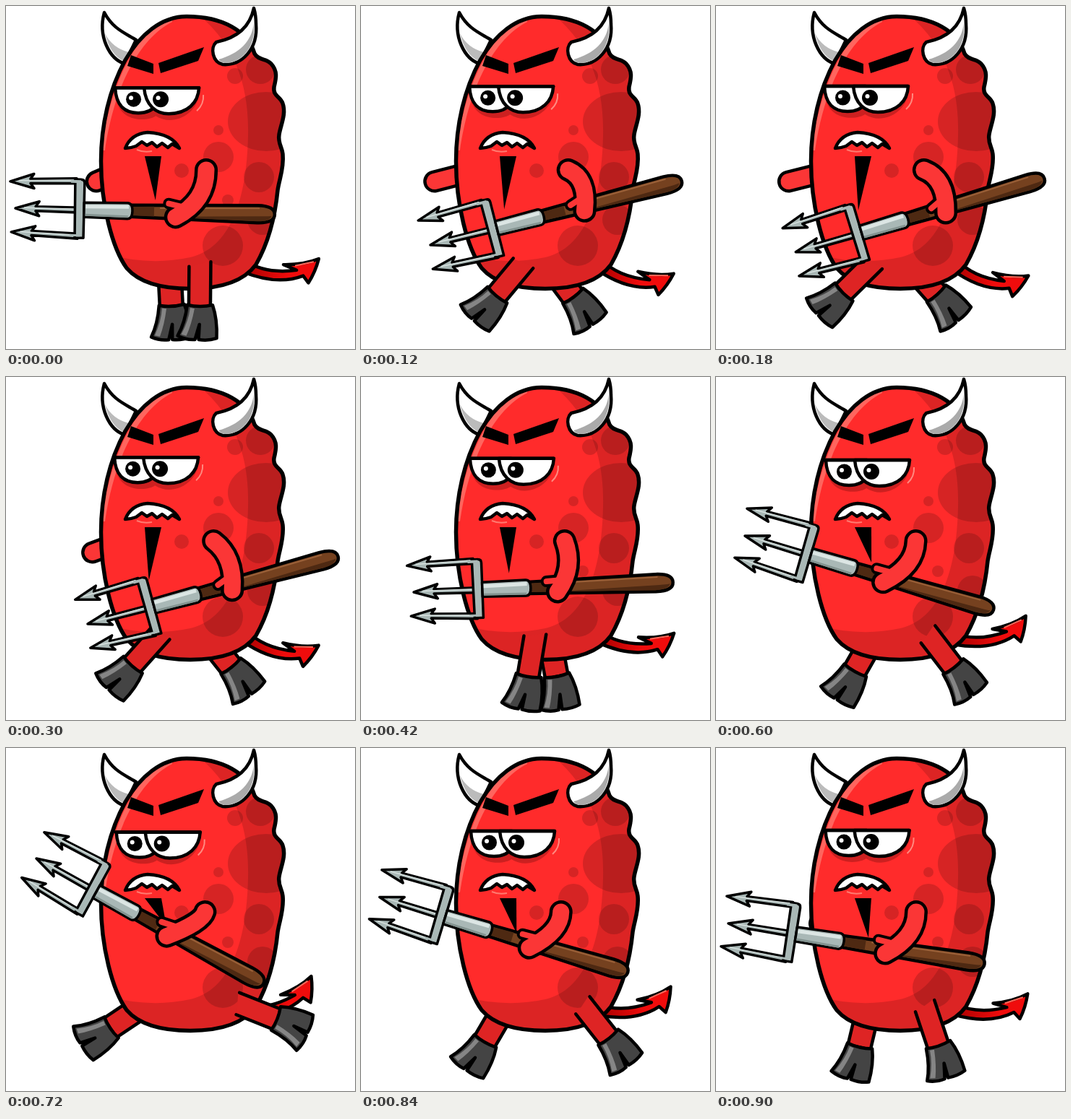
An HTML page that plays this animation: 483 by 475 pixels, repeating every 0.96 s.

```html
<!DOCTYPE html>
<html lang="en">
<head>
<meta charset="utf-8">
<title>Marching devil</title>
<style>
  html, body { margin: 0; height: 100%; overflow: hidden; background: #fff; }
  svg { display: block; width: 100vw; height: 100vh; }
  .ink { stroke: #000; stroke-width: 4.5; stroke-linejoin: round; stroke-linecap: round; }
  .line { fill: none; }
  .metal { fill: #a9b8b6; stroke-width: 3.5; }
  .limb { fill: none; stroke-linecap: round; stroke-linejoin: round; }
</style>
</head>
<body>
<svg viewBox="0 0 483 475">
  <defs>
    <path id="shape" d="M250 14.500C215 14.500 185 40 165 75C143 115 131.500 165 131.500 215C131.500 275 147 335 167 363C186 385 220 391.500 255 391.500C300 391.500 330 380 346 358C362 330 372 295 376 255C378 240 385 225 383 205C382 195 376 190 378 178C380 165 388 150 383 135C380 125 369 125 371 112C374 100 376 90 367 80C360 72 350 76 344 66C335 35 300 14.500 250 14.500Z"/>
    <clipPath id="inside"><use href="#shape"/></clipPath>
    <linearGradient id="tailRed">
      <stop offset="0" stop-color="#a80000"/><stop offset=".6" stop-color="#f00c0c"/>
    </linearGradient>
    <g id="hoof">
      <path class="ink" fill="#444" d="M-17 0Q-20 25-30 43Q-18 49-6 48L0 27L-1 48Q12 50 24 46Q25 20 18 0Q0 4-17 0Z"/>
      <path fill="#858585" d="M-13 4L-7 5Q-11 27-18 43L-25 41Q-15 22-13 4Z"/>
    </g>
    <g id="tine">
      <path class="ink metal" d="M28-3L92-3V4L28 3L33 10L0 0L33-10Z"/>
      <path class="line" stroke="#d8e2e0" stroke-width="1.500" d="M12-1H88"/>
    </g>
  </defs>

  <g id="tail">
    <path class="ink" fill="url(#tailRed)" d="M330 352Q358 372 402 367L384 359Q412 360 433 352Q428 370 418 385L411 375Q375 388 328 368Z"/>
    <path class="line" stroke="#ff6a5a" stroke-width="2" d="M400 361L426 356"/>
  </g>
  <g id="farArm" class="limb">
    <path stroke="#000" stroke-width="31"/>
    <path stroke="#fb3636" stroke-width="22"/>
  </g>
  <g id="farLeg">
    <path class="ink" fill="#de2424" d="M-16 2V-66H16V2Z"/>
    <use href="#hoof"/>
  </g>
  <path class="ink" fill="#fff" d="M136 9C148 32 166 38 180 47L164 80C143 73 127 42 136 9Z"/>
  <path fill="#bbb" d="M137 38Q147 58 170 64L164 77Q144 68 137 38Z"/>

  <g clip-path="url(#inside)">
    <path fill="#dc2424" d="M120 0H400V400H120Z"/>
    <path fill="#ff2b2b" d="M120 0H250C310 40 337 100 335 180C333 270 310 335 255 348Q200 360 140 344Z"/>
    <g id="spots" fill="#000" fill-opacity=".16"></g>
    <path fill="#ff655e" d="M230 15C185 30 145 100 132 200L137 200C150 110 185 45 230 22Z"/>
  </g>
  <use href="#shape" class="ink line" style="stroke-width:5.500"/>

  <path class="ink" fill="#fff" d="M343 3C338 27 321 44 291 50C282 58 286 78 300 81C326 83 349 60 346 25Q346 13 343 3Z"/>
  <path fill="#aaa" d="M343 24C340 49 323 66 294 74Q298 79 303 79C326 79 346 58 343 24Z"/>
  <path d="M173 68L204 80V94L168 83ZM211 79L274 57L266 76L214 93Z"/>

  <g id="eyes">
    <path fill="#cc2020" d="M152 126C156 165 199 160 207 153C230 168 263 152 267 124Z"/>
    <path class="line" stroke="#ff8a80" stroke-width="2" d="M273 124Q274 137 264 146"/>
    <path class="ink" fill="#fff" d="M151 114C152 139 165 149 183 149Q200 149 208 138V114Z"/>
    <path class="ink" fill="#fff" d="M191 114C193 139 208 150 225 150C251 150 266 135 267 114Z"/>
    <path class="ink" d="M150 114H267"/>
    <circle cx="176.500" cy="130" r="10.500"/><circle cx="214" cy="130" r="11"/>
    <circle cx="173" cy="128" r="3"/><circle cx="173" cy="128" r="3" fill="#fff"/><circle cx="210.500" cy="128" r="3" fill="#fff"/>
  </g>

  <path class="ink" fill="#fff" d="M165 197Q173 177 196 175Q230 177 240 197L230 191L224 196L216 190L209 195L202 189L195 193L188 188L180 194Q172 197 165 197Z"/>
  <path class="line" stroke="#ff7a70" stroke-width="2" d="M181 199Q190 203 202 201"/>
  <path id="goatee"/>

  <g id="nearLeg">
    <path fill="#de2424" d="M-15 2V-52L15-62V2Z"/>
    <path class="ink line" d="M-15 2V-53M15 2V-60"/>
    <use href="#hoof"/>
  </g>
  <g id="trident">
    <path class="ink" fill="#75411f" d="M158-8L335-12Q359-12 359 0Q359 12 335 12L158 8Z"/>
    <path fill="#4e2912" d="M160-6L192-7V7L340 3Q350 3 355 2Q352 10 335 10L160 6Z"/>
    <path class="line" stroke="#9a6038" stroke-width="2" d="M200-5L338-8"/>
    <use href="#tine" transform="translate(-8 -37) rotate(-2)"/>
    <use href="#tine" transform="translate(-5 33) rotate(2)"/>
    <use href="#tine"/>
    <path class="ink metal" d="M82-35V-42H90Q95-42 95-37V39H83Z"/>
    <path fill="#a9b8b6" d="M76-41H90V-37H76ZM76 34H90V37H76Z"/>
    <path class="ink metal" d="M95-10L155-11Q162-11 162 0Q162 11 155 11L95 10Z"/>
    <path fill="#dce6e4" d="M97-7L157-8V-3L97-2Z"/>
    <path class="line" stroke="#839390" stroke-width="3" d="M97 7L156 8"/>
  </g>
  <g id="arm" class="limb">
    <path stroke="#000" stroke-width="16"/>
    <path stroke="#000" stroke-width="32"/>
    <path stroke="#fb3636" stroke-width="8"/>
    <path stroke="#fb3636" stroke-width="23"/>
  </g>
</svg>
<script>
const LOOP = 960, STEP = 60, RAD = Math.PI / 180;

// Key points of the trident's middle tip; its tilt drives the rest of the body.
const keys = [
  { t: 0, x: 13, y: 280, tilt: 1.4 },
  { t: 120, x: 96, y: 331, tilt: -14.3 },
  { t: 300, x: 113, y: 342, tilt: -15.1 },
  { t: 420, x: 73, y: 298, tilt: -2.2 },
  { t: 600, x: 40, y: 220, tilt: 16.6 },
  { t: 720, x: 42, y: 153, tilt: 28.9 },
  { t: 900, x: 17, y: 243, tilt: 9 }
];

const $ = id => document.getElementById(id);
const setPaths = (id, ...ds) =>
  [...$(id).children].forEach((p, i) => p.setAttribute('d', ds[i % ds.length]));
const place = (id, x, y, angle = 0) =>
  $(id).setAttribute('transform', `translate(${x} ${y}) rotate(${angle})`);

// Key i of the endless sequence
function keyAt(i) {
  const turn = Math.floor(i / keys.length);
  const key = keys[i - turn * keys.length];
  return { ...key, t: key.t + turn * LOOP };
}

// Smooth periodic curve through the keys
function tridentAt(t) {
  const i = keys.findLastIndex(key => key.t <= t);
  const [a, b, c, d] = [i - 1, i, i + 1, i + 2].map(keyAt);
  const span = c.t - b.t, u = (t - b.t) / span, ease = u * u * (3 - 2 * u);
  const value = k => {
    const out = (c[k] - a[k]) / (c.t - a.t), into = (d[k] - b[k]) / (d.t - b.t);
    return b[k] + (c[k] - b[k]) * ease + span * u * (1 - u) * ((1 - u) * out - u * into);
  };
  return { x: value('x'), y: value('y'), tilt: value('tilt') };
}

function drawLeg(id, hip, reach, angle) {
  const a = angle * RAD;
  place(id, hip - reach * Math.sin(a), 414 - 62 * (1 - Math.cos(a)), angle);
}

// The hand slides along the handle; bend, shoulder and thumb follow it.
function drawArm({ x, y, tilt }, sway) {
  const cos = Math.cos(tilt * RAD), sin = Math.sin(tilt * RAD), grip = 210 + 12 * sway;
  const hx = x + grip * cos - 7 * sin, hy = y + grip * sin + 7 * cos;
  const out = hx - 250;
  const bx = 285 + out * .5, by = hy - 27 - out * .3;
  const thumb = (-125 - out * .55) * RAD;
  const tx = hx + 21 * Math.cos(thumb), ty = hy + 21 * Math.sin(thumb);
  setPaths('arm',
    `M${(hx + bx) / 2} ${(hy + by) / 2}L${tx} ${ty}`,
    `M${279 + out * .13} 227Q${bx} ${by} ${hx} ${hy}`);
}

function draw(t) {
  const phase = 2 * Math.PI * t / LOOP, sway = Math.cos(phase);
  const trident = tridentAt(t), { x, y, tilt } = trident;
  place('trident', x, y, tilt);
  drawArm(trident, sway);
  drawLeg('nearLeg', 260 + 9 * sway, 122, 4 - 2.5 * tilt);
  drawLeg('farLeg', 237 - 14 * sway, 110, 2.15 * tilt - 6);
  place('eyes', tilt * .06, tilt * .12 - 1);
  $('tail').setAttribute('transform', `rotate(${-.8 * tilt} 340 360)`);
  $('goatee').setAttribute('d', `M192 208H215L${206 + tilt * .55} ${270 - tilt * .8}Z`);
  setPaths('farArm', `M160 228L${150 - 50 * Math.cos(phase - Math.PI / 3)} 243`);
}

$('spots').innerHTML = [
  [317,97,11], [352,88,20], [360,160,53,41], [294,172,7], [294,209,21],
  [350,237,21], [243,228,10], [307,269,8], [355,296,21], [300,332,28]
].map(([x, y, rx, ry = rx]) => `<ellipse cx="${x}" cy="${y}" rx="${rx}" ry="${ry}"/>`).join('');

const start = performance.now();
function tick() {
  draw(Math.floor((performance.now() - start) % LOOP / STEP) * STEP);
  requestAnimationFrame(tick);
}
tick();
</script>
</body>
</html>
```
